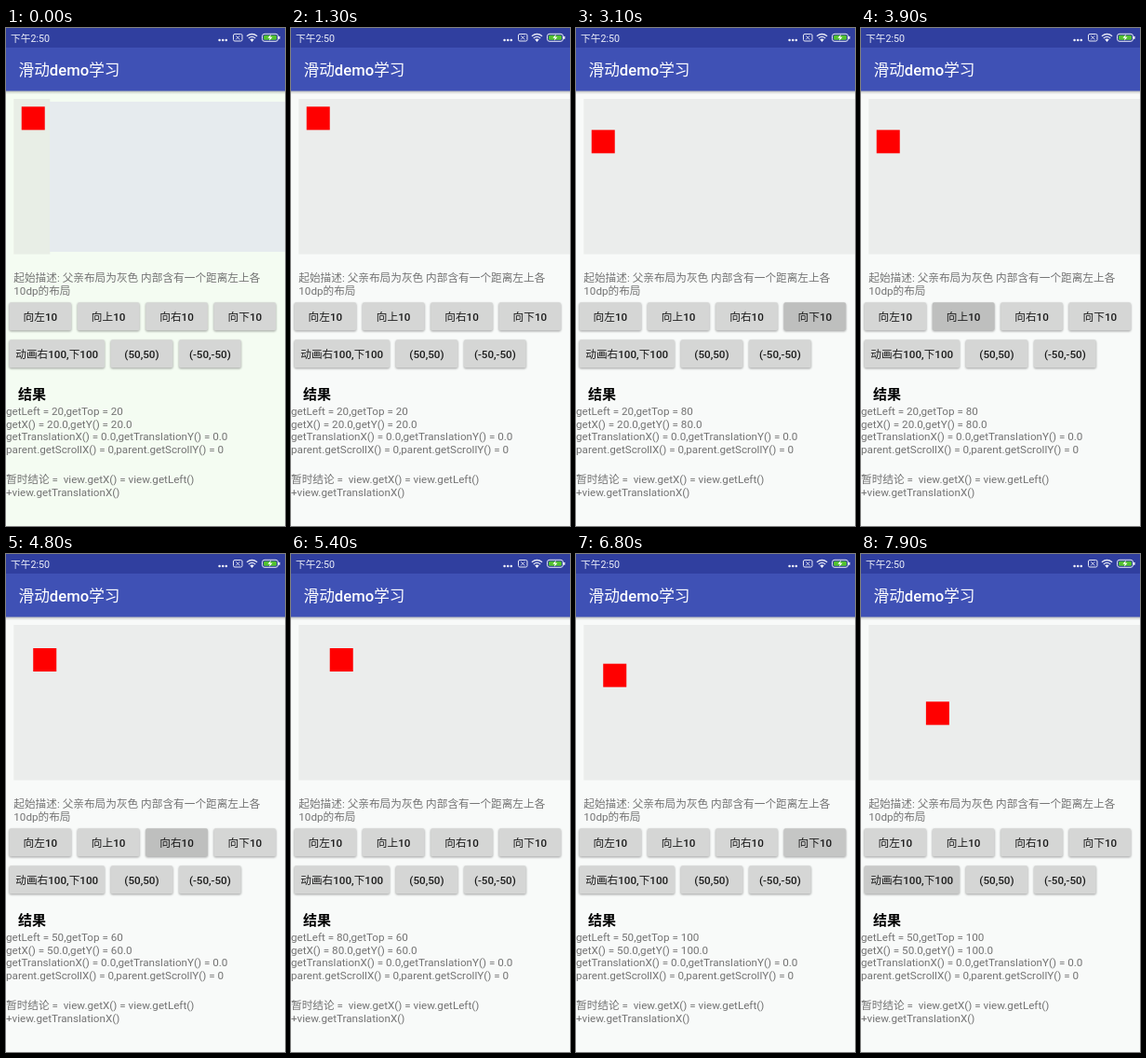
Write an HTML page that moves like this. It is 300x534 px and loops after 8000 ms.

```html
<!DOCTYPE html>
<html lang="zh-CN">
<head>
<meta charset="utf-8">
<title>滑动demo学习</title>
<style>
  html, body { margin: 0; width: 100%; height: 100%; overflow: hidden; background: #f8faf9; }
  svg { display: block; width: 300px; height: 534px; }
  text { font-family: Roboto, "Noto Sans CJK SC", "Noto Sans CJK", sans-serif; font-size: 11.67px; white-space: pre; }
  .body { fill: #737373; }
  .label { fill: #1c1c1c; text-anchor: middle; }
  .med { font-weight: 500; }
  .button rect { rx: 1.7px; }
  .face { fill: #d5d6d5; filter: drop-shadow(0 1px 1px rgba(0, 0, 0, .36)); }
</style>
</head>
<body>
<svg viewBox="0 0 300 534">
  <defs>
    <linearGradient id="shade" x2="0" y2="1">
      <stop stop-color="#000" stop-opacity=".26"/>
      <stop offset="1" stop-color="#000" stop-opacity="0"/>
    </linearGradient>
  </defs>
  <rect width="300" height="534" fill="#f8faf9"/>
  <rect x="8.3" y="76" width="292" height="166.5" fill="#ebedec"/>
  <g id="tint">
    <rect width="300" height="534" fill="#f4fcf2"/>
    <rect x="8.3" y="76" width="39" height="166.5" fill="#e8eee6"/>
    <rect x="47" y="79" width="253" height="161" fill="#e6ebee"/>
  </g>

  <rect y="67" width="300" height="4" fill="url(#shade)"/>
  <rect width="300" height="67.5" fill="#3f51b5"/>
  <rect width="300" height="21" fill="#303f9f"/>
  <text x="5" y="14.7" fill="#eef0fa" style="font-size:10.7px">下午2:50</text>
  <text x="13.5" y="50.7" fill="#fff" style="font-size:16.67px">滑动<tspan class="med">demo</tspan>学习</text>

  <g fill="#f2f3fb">
    <circle cx="229.6" cy="13" r="1.3"/>
    <circle cx="233.2" cy="13" r="1.3"/>
    <circle cx="236.8" cy="13" r="1.3"/>
  </g>
  <g fill="none" stroke="#e6e8f5">
    <rect x="244.5" y="6.5" width="9.5" height="7.5" rx="1.5"/>
    <path d="M247.3 8.3l4 4m0-4l-4 4" stroke-width=".9"/>
    <path d="M258.9 8.8q5.6-4.6 11.2 0M260.8 10.9q3.7-3 7.4 0" stroke-width="1.3"/>
  </g>
  <path d="M262.3 12.3q2.2-1.6 4.4 0l-2.2 2.6z" fill="#f2f3fb"/>
  <rect x="275.5" y="6.3" width="17" height="8" rx="2.5" fill="none" stroke="#e6e8f5"/>
  <rect x="293" y="8.7" width="1.6" height="3.2" rx=".6" fill="#e6e8f5"/>
  <rect x="277" y="7.8" width="14" height="5" rx="1.4" fill="#52c22f"/>
  <path d="M285 6.8l-3.6 4h2.4l-.9 3 3.6-4h-2.4z" fill="#fff"/>

  <rect id="box" width="25" height="25" fill="#f00"/>
  <g class="body">
    <text x="8.3" y="272">起始描述: 父亲布局为灰色 内部含有一个距离左上各</text>
    <text x="8.3" y="286">10dp的布局</text>
    <text id="edges" y="415"/>
    <text id="pos" y="428.6"/>
    <text y="442.3">getTranslationX() = 0.0,getTranslationY() = 0.0</text>
    <text y="456">parent.getScrollX() = 0,parent.getScrollY() = 0</text>
    <text y="488.3">暂时结论 =  view.getX() = view.getLeft()</text>
    <text y="502.3">+view.getTranslationX()</text>
  </g>
  <text x="13" y="398" fill="#000" style="font-size:15px;font-weight:700">结果</text>
  <g id="buttons"></g>
</svg>
<script>
const LOOP = 8000, STEP = 100, DP = 300 / 720;
const $ = id => document.getElementById(id);

// label, x, y, width, press intervals [down, up]
const buttons = [
  ['向左10', 3.5, 294.3, 66.7, [[5500, 6000]]],
  ['向上10', 76.8, 294.3, 66.7, [[3600, 4300]]],
  ['向右10', 150.2, 294.3, 66.7, [[4300, 5000]]],
  ['向下10', 223.5, 294.3, 66.7, [[1800, 1900], [2300, 3200], [6100, 6700]]],
  ['动画右100,下100', 3.5, 334.2, 102.5, [[7800, 8000]]],
  ['(50,50)', 112.6, 334.2, 66.7, []],
  ['(-50,-50)', 186, 334.2, 66.7, []]
];

// time, left, top
const moves = [
  [0, 20, 20], [2000, 20, 40], [2500, 20, 60], [2800, 20, 80], [3200, 20, 100],
  [3800, 20, 80], [4200, 20, 60], [4500, 50, 60], [4900, 80, 60], [5700, 50, 60],
  [6300, 50, 80], [6500, 50, 100]
];
const slide = { start: 7630, length: 300, by: 100 };

$('buttons').innerHTML = buttons.map(([label, x, y, w]) => `
  <g class="button">
    <rect class="face" x="${x}" y="${y}" width="${w}" height="30"/>
    <rect class="press" x="${x}" y="${y}" width="${w}" height="30"/>
    <text class="label med" x="${x + w / 2}" y="${y + 19.3}">${label}</text>
  </g>`).join('');
const overlays = document.querySelectorAll('.press');

const clamp = v => Math.max(0, Math.min(1, v));
const ease = p => (1 - Math.cos(Math.PI * p)) / 2;
const pressLevel = (t, [down, up]) => clamp(Math.min((t - down) / 200, 1 - (t - up) / 300));

function draw(t) {
  const [, left, top] = moves.filter(m => m[0] <= t).pop();
  const shift = slide.by * ease(clamp((t - slide.start) / slide.length));
  $('box').setAttribute('x', 8.4 + (left + shift) * DP);
  $('box').setAttribute('y', 76 + (top + shift) * DP);
  $('edges').textContent = `getLeft = ${left},getTop = ${top}`;
  $('pos').textContent = `getX() = ${left}.0,getY() = ${top}.0`;
  $('tint').setAttribute('opacity', clamp(1 - t / 900));
  buttons.forEach((b, i) => {
    const level = Math.max(0, ...b[4].map(p => pressLevel(t, p)));
    overlays[i].setAttribute('opacity', level * .11);
  });
}

let shown = -1;
function tick() {
  const t = Math.floor(performance.now() % LOOP / STEP) * STEP;
  if (t !== shown) draw(shown = t);
  requestAnimationFrame(tick);
}
tick();
</script>
</body>
</html>
```
